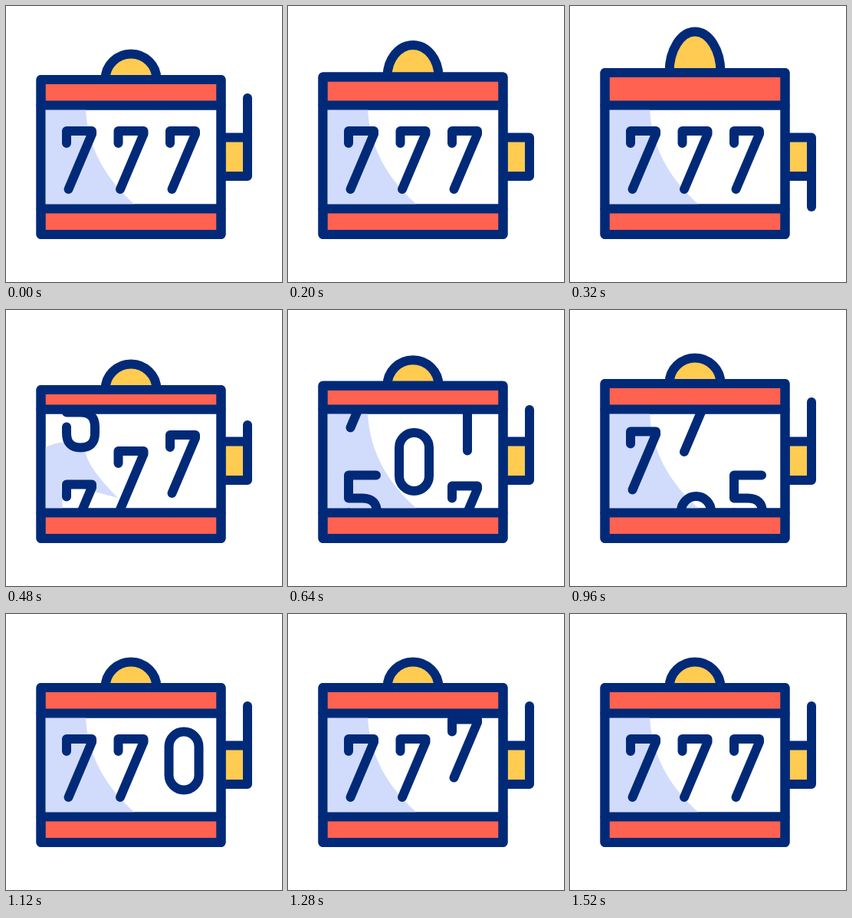
An HTML page with a canvas that plays this animation: 360 px wide and 360 px high, repeating every 2000 ms.

```html
<!DOCTYPE html>
<html lang="en">
<head>
<meta charset="utf-8">
<title>Slot machine</title>
<style>
html, body { margin: 0; width: 100%; height: 100%; overflow: hidden; background: #fff; }
canvas { display: block; }
</style>
</head>
<body>
<canvas width="360" height="360"></canvas>
<script>
const ctx = document.querySelector('canvas').getContext('2d');
const LOOP = 2000, STEP = 40;
const NAVY = '#002a78', RED = '#ff6250', YELLOW = '#ffcb50', SHADE = '#d1dbfc';
const LEFT = 45.5, WIDTH = 235, BOTTOM = 298, WINDOW_TOP = 129.5, WINDOW_BOTTOM = 264.5;
const REST_ROW = 163, REEL_SPEED = 0.7;

const glyphs = {
  0: new Path2D('M-1.5 19.5A19.5 19.5 0 0 1 37.5 19.5V56.5A19.5 19.5 0 0 1 -1.5 56.5Z'),
  1: new Path2D('M6 12L20 0V76'),
  5: new Path2D('M36 0H0V30H18Q37 30 37 49V57Q37 76 18 76Q0 76 0 57V49'),
  7: new Path2D('M0 16V0H33V4L2.5 76')
};

// Digits are [glyph, distance above the resting row]; the last one stops on it.
const reels = [
  { x: 79, start: 388, digits: [[7, 0], [5, 124], [7, 262], [7, 405]] },
  { x: 146.5, start: 450, digits: [[7, 0], [0, 136], [0, 277], [7, 411]] },
  { x: 214, start: 545, digits: [[7, 0], [1, 122], [5, 238], [0, 412], [7, 540]] }
];

const clamp = (v, lo, hi) => Math.min(hi, Math.max(lo, v));

// Rises from 0 at `from` to 1 at `peak`, then falls back to 0 at `to`.
const bump = (t, from, peak, to) =>
  Math.max(0, Math.min((t - from) / (peak - from), (to - t) / (to - peak)));

function paint(fill) {
  ctx.fillStyle = fill;
  ctx.fill();
  ctx.stroke();
}

function box(x, y, w, h, fill) {
  ctx.beginPath();
  ctx.rect(x, y, w, h);
  paint(fill);
}

function drawShade(swirl) {
  ctx.beginPath();
  ctx.moveTo(50, 134 + 46 * swirl);
  ctx.quadraticCurveTo(85, 134 + 28 * swirl, 104, 134 + 52 * swirl);
  ctx.quadraticCurveTo(107, 206, 169 - 23 * swirl, 260 - 15 * swirl);
  ctx.lineTo(72, 260 - 34 * swirl);
  ctx.lineTo(74, 260);
  ctx.lineTo(50, 260);
  ctx.fillStyle = SHADE;
  ctx.fill();
}

function drawReel({ x, start, digits }, t) {
  const travel = clamp((t - start) * REEL_SPEED, 0, digits.at(-1)[1]);
  for (const [digit, above] of digits) {
    ctx.save();
    ctx.translate(x, REST_ROW + travel - above);
    ctx.stroke(glyphs[digit]);
    ctx.restore();
  }
}

function draw(t) {
  const pull = bump(t, 120, 320, 480);
  const rebound = bump(t, 320, 480, 720);
  const top = 96 - 9 * pull + 8 * rebound;

  ctx.fillStyle = '#fff';
  ctx.fillRect(0, 0, 360, 360);
  ctx.strokeStyle = NAVY;
  ctx.lineWidth = 12;
  ctx.lineCap = ctx.lineJoin = 'round';

  // Lever
  box(LEFT + WIDTH, 171.5, 34.5, 50.5, YELLOW);
  ctx.beginPath();
  ctx.moveTo(315, 197);
  ctx.lineTo(315, 120 + 142 * pull + 30 * rebound);
  ctx.stroke();

  // Dome
  ctx.beginPath();
  ctx.ellipse(163, top, 33.5, 33.5 + 20 * pull, 0, Math.PI, 0);
  paint(YELLOW);

  // Window with the reels
  box(LEFT, WINDOW_TOP, WIDTH, WINDOW_BOTTOM - WINDOW_TOP, '#fff');
  ctx.save();
  ctx.beginPath();
  ctx.rect(LEFT, WINDOW_TOP, WIDTH, WINDOW_BOTTOM - WINDOW_TOP);
  ctx.clip();
  drawShade(bump(t, 320, 480, 640));
  for (const reel of reels) drawReel(reel, t);
  ctx.restore();

  // Red bands and casing
  box(LEFT, top, WIDTH, WINDOW_TOP - top, RED);
  box(LEFT, WINDOW_BOTTOM, WIDTH, BOTTOM - WINDOW_BOTTOM, RED);
  ctx.strokeRect(LEFT, top, WIDTH, BOTTOM - top);
}

function tick() {
  draw(Math.floor(performance.now() % LOOP / STEP) * STEP);
  requestAnimationFrame(tick);
}
tick();
</script>
</body>
</html>
```
